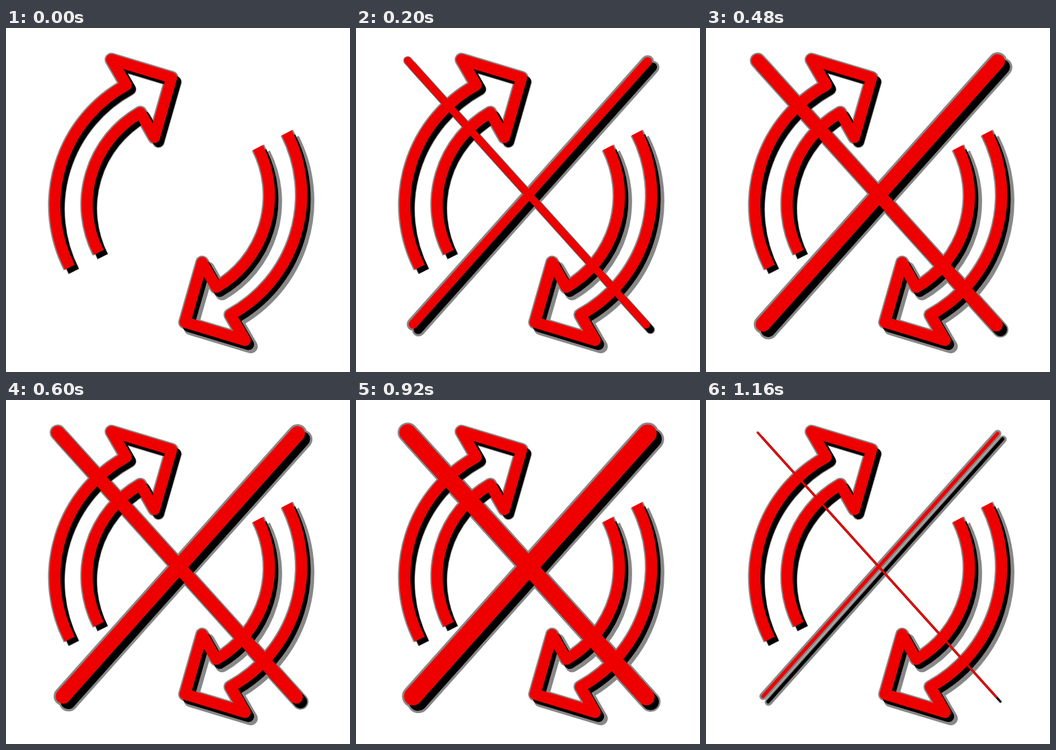
An HTML page for the animation above (1.2 s loop, 512 by 512 pixels).

```html
<!DOCTYPE html>
<html lang="en">
<head>
<meta charset="utf-8">
<title>Crossed-out cycle arrows</title>
<style>
  html, body { margin: 0; width: 100%; height: 100%; overflow: hidden; background: #fff; }
  svg { display: block; width: 100%; height: 100%; }
</style>
</head>
<body>
<svg viewBox="0 0 512 512" fill="none" stroke-linejoin="round"></svg>
<script>
  const LOOP = 1200, STEP = 40;
  const RED = '#e00', BLACK = '#000', GREY = '#888';
  const ARROW_WIDTH = 16.5;
  const ARROW = 'M95 356 A203.3 203.3 0 0 1 179 85 L157 47 L246.5 74 L221 163 L200 126 A157.4 157.4 0 0 0 138 334';
  const svg = document.querySelector('svg');

  // Each part: path, cap, soft edge and its shift, hard shadow shift, width rule
  const arrowWidth = () => ARROW_WIDTH;
  const parts = [
    { d: ARROW, cap: 'butt', width: arrowWidth, edge: () => 4, soft: [6, 6.5], hard: [6, 6], softEdge: () => 1.5 },
    { d: ARROW, turn: 'rotate(180 256.5 256)', cap: 'butt', width: arrowWidth, edge: () => 4,
      soft: [8.5, 9], hard: [5, 6] },
    { d: 'M434 50 L85 441', cap: 'round', width: w => w && w + 2.2, edge: () => 6, soft: [8, 8.5], hard: [7.5, 8] },
    { d: 'M77 48.5 L432 442', cap: 'round', width: w => w, edge: w => w * 0.2, soft: [6.3, 7], hard: [6.3, 7] }
  ];

  const strokes = [];

  function addStroke(part, color, [dx, dy], extra) {
    const el = document.createElementNS('http://www.w3.org/2000/svg', 'path');
    el.setAttribute('d', part.d);
    el.setAttribute('stroke', color);
    el.setAttribute('stroke-linecap', part.cap);
    el.setAttribute('transform', `translate(${dx} ${dy}) ${part.turn || ''}`);
    svg.append(el);
    strokes.push({ el, part, extra });
  }

  // All soft edges lie below all hard shadows, and those below the red
  for (const part of parts) {
    addStroke(part, GREY, [0, 0], part.edge);
    addStroke(part, GREY, part.soft, part.softEdge || part.edge);
  }
  for (const part of parts) addStroke(part, BLACK, part.hard, () => 0);
  for (const part of parts) addStroke(part, RED, [0, 0], () => 0);

  // Line width over time: grow, settle, swell, collapse
  const keys = [
    [0, 0], [200, 11], [320, 17.3], [440, 19.5], [600, 20], [760, 21.2],
    [920, 25], [1000, 22], [1080, 10], [1120, 5.5], [1160, 3], [1200, 0]
  ];

  function rate(i) {
    const [t0, w0] = keys[i], [t1, w1] = keys[i + 1];
    return (w1 - w0) / (t1 - t0);
  }

  function slope(i) {
    if (i === 0) return rate(0);
    if (i === keys.length - 1) return rate(i - 1);
    const a = rate(i - 1), b = rate(i);
    return a * b > 0 ? 2 * a * b / (a + b) : 0;
  }

  function widthAt(t) {
    const i = keys.findIndex(k => k[0] > t) - 1;
    const [t0, w0] = keys[i], [t1, w1] = keys[i + 1];
    const d = t1 - t0, p = (t - t0) / d, q = 1 - p;
    return q * q * (1 + 2 * p) * w0 + p * p * (3 - 2 * p) * w1
      + d * p * q * (q * slope(i) - p * slope(i + 1));
  }

  function draw(time) {
    const w = widthAt(Math.floor((time % LOOP) / STEP) * STEP);
    for (const { el, part, extra } of strokes) {
      const base = part.width(w);
      el.setAttribute('stroke-width', base > 0 ? base + extra(w) : 0);
    }
  }

  let start;
  function tick(now) {
    if (start === undefined) start = now;
    draw(Math.max(0, now - start));
    requestAnimationFrame(tick);
  }
  draw(0);
  requestAnimationFrame(tick);
</script>
</body>
</html>
```
